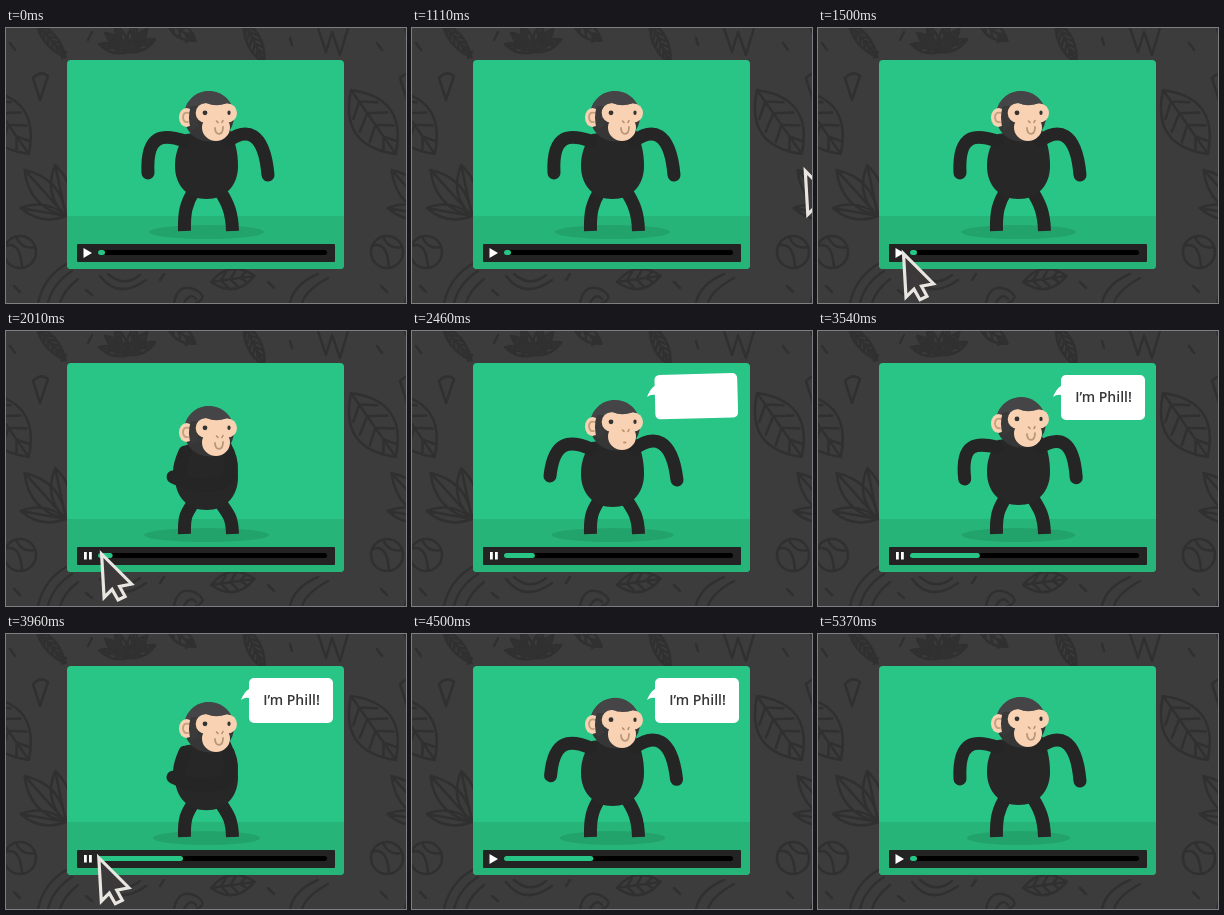
Recreate the animation shown at these times as an HTML page. Size 400 by 275 pixels, loop 5.4 s.

```html
<!DOCTYPE html>
<html>
<head>
<meta charset="utf-8">
<style>
  html, body { margin: 0; height: 100%; overflow: hidden; background: #3c3c3c; }
  svg { display: block; width: 100vw; height: 100vh; }
  .line { fill: none; stroke-linecap: round; stroke-linejoin: round; }
  .limb { fill: none; stroke: #252525; stroke-width: 13; }
  text { font: 600 14px "Open Sans", "Noto Sans", sans-serif; fill: #383838; text-anchor: middle; }
</style>
</head>
<body>
<svg viewBox="0 0 400 275">
  <rect width="400" height="275" fill="#3c3c3c"/>
  <g id="tile" class="line" stroke="#303030" stroke-width="2.5">
    <path id="leaves"/>
    <circle cx="14" cy="224" r="16"/>
    <path d="M-1 218Q14 212 16 239M10 209Q16 222 29 219M32 275Q38 248 62 235M42 275Q47 255 66 243M54 275Q58 262 72 251
      M94 248Q112 272 140 252M102 246Q118 260 134 247M168 275Q172 254 190 262Q203 270 190 275M178 275Q184 264 190 271
      M284 275Q288 256 312 246M296 275Q300 262 322 250M4 15L9 22M86 4L82 12M180 14L186 8M284 10L286 17M60 24L56 30
      M312 0L320 24L326 4L334 27L342 0M27 50L34 72L42 48M27 50Q35 42 42 48M80 262L86 267M154 252L158 246M262 254L268 260M8 258L14 264"/>
  </g>
  <use href="#tile" x="367"/>

  <rect x="61" y="32" width="277" height="209" rx="4" fill="#29c587"/>
  <path d="M61 188H338V237a4 4 0 0 1-4 4H65a4 4 0 0 1-4-4Z" fill="#26b478"/>
  <ellipse id="shadow" cx="200.5" cy="204" ry="7" fill="#23a36c"/>

  <path id="legs" class="limb"/>
  <g id="body">
    <path d="M180 106C171 118 169 128 169 138C169 158 182 171 200.5 171S232 158 232 138C232 124 229 112 223 100Z" fill="#272727"/>
    <path id="arms" class="limb" stroke-linecap="round"/>
  </g>
  <g id="head">
    <circle cx="203" cy="88.500" r="25" fill="#363636"/>
    <path d="M178 87A25 25 0 0 1 227 81L216 90Z" fill="#454547"/>
    <ellipse cx="180.500" cy="89.500" rx="7.500" ry="9.500" fill="#f8d2b3"/>
    <path class="line" d="M183 85Q177 83 177 90Q178 95 182 94" stroke="#c5a080" stroke-width="1.800"/>
    <path d="M185 78Q181 89 185 102L192 98V78Z" fill="#3a3a3b"/>
    <g fill="#f8d2b3">
      <circle cx="199.500" cy="85" r="9.800"/>
      <circle cx="221.500" cy="85" r="9.500"/>
      <path d="M199 75.200Q210 79 221 75.500V95H199Z"/>
      <ellipse cx="210" cy="99.500" rx="14" ry="13.500"/>
    </g>
    <circle cx="199" cy="84.800" r="2.400" fill="#333"/>
    <ellipse cx="223" cy="84.800" rx="1.600" ry="2.200" fill="#333"/>
    <path class="line" d="M210.500 93L212 94.500M217 92.500L216 94.500" stroke="#b08c6c" stroke-width="1.500"/>
    <path id="mouth" class="line" stroke="#b8977a" stroke-width="1.800"/>
  </g>

  <g id="bubble">
    <path d="M248 44H322a5 5 0 0 1 5 5V84a5 5 0 0 1-5 5H248a5 5 0 0 1-5-5V64Q239 63 235 66Q238 58 243 55V49a5 5 0 0 1 5-5Z" fill="#fff"/>
    <text id="words" x="285.500" y="71">I’m Phill!</text>
  </g>

  <rect x="71" y="216" width="258" height="18" rx="1" fill="#232323"/>
  <rect x="92" y="222" width="229" height="5" rx="2.500" fill="#000"/>
  <rect id="bar" x="92" y="222" height="5" rx="2.500" fill="#29c587"/>
  <path id="icon" fill="#fff"/>
  <path id="cursor" d="M1.500 1.500L4 45L12 37L18 47.500L25 44L19.500 34L31.500 31.500Z" fill="#3a3838" stroke="#e9e6e1" stroke-width="3.200"/>
</svg>
<script>
const LOOP = 5400, CLICK_ON = 1800, CLICK_OFF = 4080;
const $ = id => document.getElementById(id);
const set = (id, name, value) => $(id).setAttribute(name, value);

// A pointed leaf with a midrib and paired veins
function leaf(x, y, length, width, degrees, veins = 4) {
  const a = degrees * Math.PI / 180;
  const at = (u, v) => `${x + u * Math.cos(a) - v * Math.sin(a)} ${y + u * Math.sin(a) + v * Math.cos(a)}`;
  const half = length / 2;
  let d = `M${at(0, 0)}Q${at(half, -width)} ${at(length, 0)}Q${at(half, width)} ${at(0, 0)}L${at(length, 0)}`;
  for (let i = 1; i <= veins; i++) {
    const p = i / (veins + 1.5), q = p + 0.14, h = width * 1.6 * q * (1 - q);
    d += `M${at(q * length, -h)}L${at(p * length, 0)}L${at(q * length, h)}`;
  }
  return d;
}

const fern = [-70, -45, -20, 20, 45, 70].map(a => leaf(122, 24, 30, 9, a - 95, 2));
set("leaves", "d", [
  leaf(-22, 62, 78, 42, 55), leaf(60, 188, 62, 22, 228, 0), leaf(60, 188, 52, 18, 258, 0),
  leaf(60, 188, 46, 14, 190, 0), leaf(30, -6, 46, 12, 50, 6), leaf(205, 254, 44, 20, -8, 3),
  leaf(238, -8, 48, 14, 65, 6), leaf(160, -8, 36, 14, 35, 3), ...fern
].join(""));

// Eased interpolation over [time, value] keys; values are numbers or arrays
function key(t, keys) {
  const n = keys.findIndex(k => k[0] > t);
  if (n === 0) return keys[0][1];
  if (n < 0) return keys[keys.length - 1][1];
  const [[t0, a], [t1, b]] = [keys[n - 1], keys[n]];
  const e = (1 - Math.cos(Math.PI * (t - t0) / (t1 - t0))) / 2;
  return Array.isArray(a) ? a.map((v, i) => v + (b[i] - v) * e) : a + (b - a) * e;
}

// Arm poses: two curve handles and the hand
const L = {
  rest: [158, 106, 140, 105, 142, 145],
  fold: [165, 144, 178, 150, 210, 144],
  out: [158, 104, 142, 104, 138, 140],
  wide: [156, 102, 134, 100, 124, 130],
  bent: [150, 110, 138, 113, 152, 153]
};
const R = {
  rest: [240, 100, 258, 102, 262, 147],
  fold: [238, 152, 195, 152, 167, 138],
  out: [242, 98, 260, 102, 265, 144]
};
const leftKeys = [[1800, L.rest], [2000, L.fold], [2080, L.fold], [2460, L.out], [2640, L.wide], [2910, L.bent],
  [3060, L.bent], [3480, L.rest], [3840, L.fold], [4120, L.fold], [4400, L.out], [4800, L.rest]];
const rightKeys = [[1800, R.rest], [2000, R.fold], [2080, R.fold], [2460, R.out],
  [3480, R.out], [3840, R.fold], [4120, R.fold], [4400, R.out], [4800, R.rest]];
const bodyKeys = [[1800, 0], [2010, 8], [2240, -3], [2460, 5], [2760, 3], [3060, 5], [3480, 3],
  [3900, 5], [4110, 6], [4330, -1], [4620, 2], [5190, 0]];
const headKeys = [[1800, 0], [2010, 12], [2240, -5], [2460, 6], [2760, 3], [3060, 6], [3480, 3],
  [3900, 4.5], [4110, 7], [4330, -1], [4620, 2], [5190, 0.4], [5370, 0]];
const shadowKeys = [[1800, 57.5], [2010, 62.5], [2460, 61], [3060, 61], [3960, 53.5], [5190, 51.5]];
const away = [401, 139], button = [81, 225];
const cursorKeys = [[1060, away], [1530, button], [1962, button], [2340, away],
  [3545, away], [4015, button], [4190, button], [4600, [255, 290]]];
const scaleKeys = [[2220, 0], [2370, 1.05], [2460, 0.985], [2600, 1], [4660, 1], [4760, 1.06], [4980, 0]];
const tiltKeys = [[2220, -20], [2370, 4], [2460, -1.5], [2600, 0], [4660, 0], [4980, -15]];

const SMILE = "M209 100C209 108 217 108 217 99";
const TALK = ["M212 105.500h1.500", "M209.500 105Q213 106.500 216 104.500"];

function draw(now) {
  const t = now % LOOP;
  const bob = key(t, bodyKeys), nod = key(t, headKeys);
  const playing = t >= CLICK_ON && t < CLICK_OFF;

  set("body", "transform", `translate(0 ${bob})`);
  set("head", "transform", `translate(0 ${nod})`);
  set("arms", "d", `M179 113C${key(t, leftKeys)}M222 113C${key(t, rightKeys)}`);
  set("legs", "d", `M178.500 203C178 185 180 ${175 + bob} 188 ${163 + bob}M226.500 203C226 185 222 ${175 + bob} 214 ${163 + bob}`);
  set("shadow", "rx", key(t, shadowKeys));
  const talking = t > 2400 && t < 3420;
  set("mouth", "d", talking ? TALK[Math.floor((t - 2400) / 120) % 2] : SMILE);

  set("bubble", "transform", `translate(236 65) rotate(${key(t, tiltKeys)}) scale(${key(t, scaleKeys)}) translate(-236 -65)`);
  set("words", "opacity", key(t, [[2490, 0], [2640, 1]]));

  const played = 0.0361 * (Math.min(Math.max(t, CLICK_ON), CLICK_OFF) - CLICK_ON);
  set("bar", "width", 7 + played * key(t, [[4650, 1], [5190, 0]]));
  set("icon", "d", playing ? "M78 221h2.800v7.500h-2.800zM83 221h2.800v7.500h-2.800z" : "M77.500 220L86 225L77.500 230Z");
  set("cursor", "transform", `translate(${key(t, cursorKeys)})`);
  set("cursor", "visibility", t < 1060 || t > 4600 ? "hidden" : "visible");
}

const start = performance.now();
(function tick() {
  draw(performance.now() - start);
  requestAnimationFrame(tick);
})();
</script>
</body>
</html>
```
